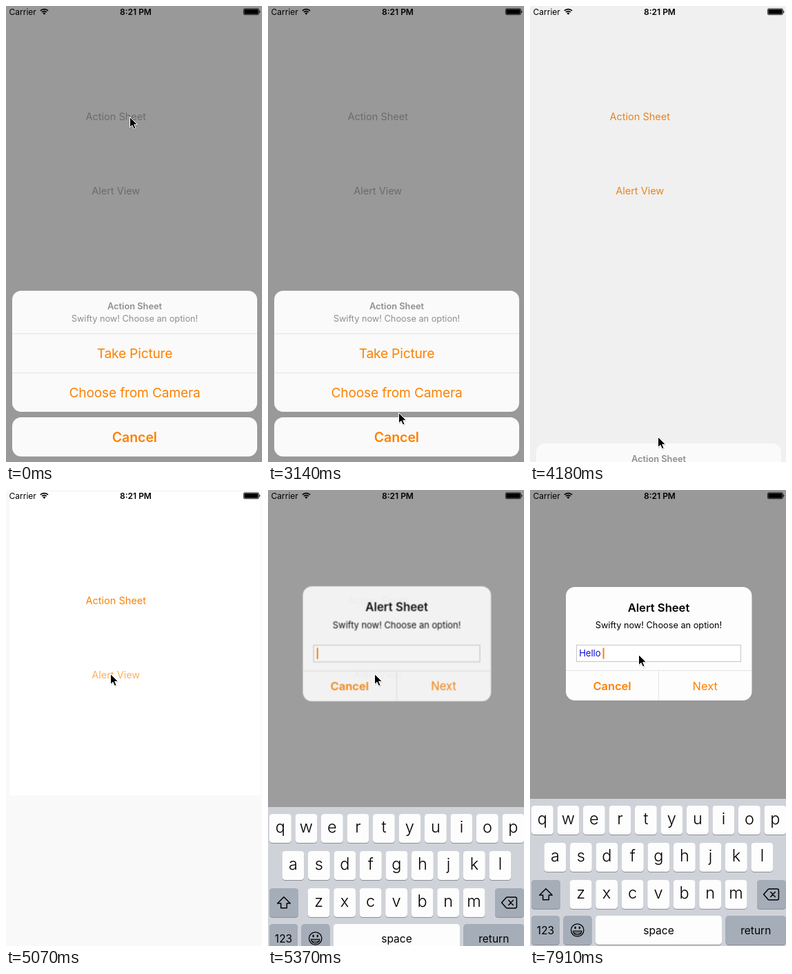
An HTML page for the animation above (8 s loop, 371 px wide and 663 px high).

```html
<!DOCTYPE html>
<html lang="en">
<head>
<meta charset="utf-8">
<title>Action sheet and alert</title>
<style>
  html, body { margin: 0; width: 100%; height: 100%; overflow: hidden; background: #999; }
  svg { display: block; width: 371px; height: 663px; font-family: Inter, Roboto, sans-serif; }
  .mid { text-anchor: middle; }
  .semi { font-weight: 600; }
  .tint { fill: #ff8000; }
  .row { font-size: 19.2px; letter-spacing: -.2px; }
  .note { font-size: 12.75px; }
  .btn { font-size: 16.4px; }
  .letter { font-size: 23.5px; font-weight: 300; }
  .word { font-size: 15.5px; }
  .icon { fill: none; stroke: #000; stroke-width: 1.5; stroke-linejoin: round; stroke-linecap: round; }

  .anim { animation: 8s step-end infinite; }
  #page { animation-name: page; }
  #glow { animation-name: glow; }
  #open-sheet { animation-name: sheet-label; font-size: 14.5px; }
  #open-alert { animation-name: alert-label; font-size: 14.5px; }
  #sheet { animation-name: sheet; }
  #cancel { animation-name: press; }
  #alert { animation-name: alert; transform-origin: 186.5px 223.5px; }
  #keys { animation-name: keys; }
  #typed { animation-name: typed; }
  #caret { animation-name: caret, blink; }
  #pointer { animation-name: pointer; }

  @keyframes page {
    0% { fill: #999; }
    50.375% { fill: #bcbcbc; }
    52.25% { fill: #f0f0f0; }
    54.125% { fill: #f9f9f9; }
    65.25% { fill: #bebebe; }
    67.125% { fill: #9d9d9d; }
    69%, 100% { fill: #999; }
  }
  @keyframes glow {
    0% { visibility: hidden; }
    55.875% { visibility: visible; }
    65.25%, 100% { visibility: hidden; }
  }
  @keyframes sheet-label {
    0% { fill: #6b6b6b; }
    50.375% { fill: #9c7245; }
    52.25% { fill: #e78420; }
    54.125% { fill: #ff8000; }
    65.25% { fill: #a07548; }
    67.125%, 100% { fill: #6b6b6b; }
  }
  @keyframes alert-label {
    0% { fill: #6b6b6b; }
    50.375% { fill: #9c7245; }
    52.25% { fill: #e78420; }
    54.125% { fill: #ff8000; }
    63.375% { fill: #ffb05c; }
    65.25% { fill: #a07548; }
    67.125%, 100% { fill: #6b6b6b; }
  }
  @keyframes sheet {
    0% { transform: translateY(0); visibility: visible; }
    50.375% { transform: translateY(88.5px); }
    52.25% { transform: translateY(222px); visibility: visible; }
    54.125%, 100% { transform: translateY(260px); visibility: hidden; }
  }
  @keyframes press {
    0% { fill: #fafafa; }
    46.75% { fill: #e8e8e8; }
    48.5%, 100% { fill: #fafafa; }
  }
  @keyframes alert {
    0% { opacity: 0; transform: scale(1.2); }
    65.25% { opacity: .5; transform: scale(1.08); }
    67.125% { opacity: .89; transform: scale(1.012); }
    69%, 100% { opacity: 1; transform: none; }
  }
  @keyframes keys {
    0% { transform: translateY(220px); }
    65.25% { transform: translateY(110px); }
    67.125% { transform: translateY(12px); }
    69%, 100% { transform: none; }
  }
  @keyframes typed {
    0% { width: 0; }
    84% { width: 10px; }
    87.75% { width: 17.5px; }
    91.5% { width: 20.8px; }
    93.375% { width: 24px; }
    95.125%, 100% { width: 36px; }
  }
  @keyframes caret {
    0% { transform: none; }
    84% { transform: translateX(9px); }
    87.75% { transform: translateX(16.4px); }
    91.5% { transform: translateX(19.7px); }
    93.375% { transform: translateX(23px); }
    95.125% { transform: translateX(30.3px); }
    98.875%, 100% { transform: translateX(33.5px); }
  }
  @keyframes blink {
    0% { opacity: 1; }
    72.75% { opacity: 0; }
    78.375%, 100% { opacity: 1; }
  }
  @keyframes pointer {
    0% { transform: translate(179px, 161px); }
    1.875% { transform: translate(184px, 232px); }
    3.75% { transform: translate(196px, 420px); }
    5.5% { transform: translate(200px, 504px); }
    39.25% { transform: translate(189px, 591px); }
    41.125% { transform: translate(187px, 604px); }
    44.875% { transform: translate(185px, 626px); }
    55.875% { transform: translate(176px, 480px); }
    57.75% { transform: translate(156px, 300px); }
    61.5% { transform: translate(151px, 267px); }
    65.25% { transform: translate(153px, 267px); }
    67.125% { transform: translate(154px, 267px); }
    70.875% { transform: translate(156px, 255px); }
    72.75% { transform: translate(158px, 239px); }
    74.625%, 100% { transform: translate(157px, 239px); }
  }
</style>
</head>
<body>
<svg viewBox="0 0 371 663">
  <defs>
    <clipPath id="reveal"><rect id="typed" class="anim" x="71" y="226" width="0" height="23"/></clipPath>
  </defs>

  <rect id="page" class="anim" width="371" height="663"/>
  <rect id="glow" class="anim" x="5" y="3" width="364" height="441" fill="#fff"/>
  <text id="open-sheet" class="anim mid" x="159.3" y="166.3">Action Sheet</text>
  <text id="open-alert" class="anim mid" x="159.2" y="274.3">Alert View</text>

  <g id="status" font-size="12">
    <text x="4.6" y="12.7">Carrier</text>
    <text class="mid semi" x="188" y="12.7">8:21 PM</text>
    <g fill="none" stroke="#000" stroke-width="1.7">
      <path d="M49.8 6.9a7.9 7.9 0 0 1 11.2 0"/>
      <path d="M51.9 9a4.9 4.9 0 0 1 7 0"/>
    </g>
    <path d="M55.4 12.8l-2.1-2.2a3 3 0 0 1 4.2 0z"/>
    <rect x="344.4" y="3.9" width="22" height="8.8" rx="1.6" fill="none" stroke="#000" stroke-width=".8"/>
    <rect x="345.3" y="4.8" width="20.2" height="7" rx=".8"/>
    <path d="M367.3 6.6a2 2 0 0 1 0 3.6z"/>
  </g>

  <g id="sheet" class="anim">
    <rect x="9" y="414" width="355" height="176" rx="13" fill="#fafafa"/>
    <path d="M9 476.5h355M9 533.5h355" stroke="#e4e4e4"/>
    <g fill="#8f8f8f" class="mid">
      <text class="semi" font-size="12.8" x="186.5" y="441">Action Sheet</text>
      <text class="note" x="186.5" y="458.6">Swifty now! Choose an option!</text>
    </g>
    <g class="mid tint">
      <text class="row" x="186.5" y="512">Take Picture</text>
      <text class="row" x="186.5" y="569">Choose from Camera</text>
    </g>
    <rect id="cancel" class="anim" x="9" y="598" width="355" height="57" rx="13"/>
    <text class="mid tint semi" font-size="19.4" x="186.4" y="633.5">Cancel</text>
  </g>

  <g id="alert" class="anim">
    <rect x="52" y="141" width="269.5" height="165" rx="13" fill="#fdfdfd"/>
    <g class="mid">
      <text class="semi" font-size="16.6" x="186.5" y="177">Alert Sheet</text>
      <text class="note" x="186.5" y="201">Swifty now! Choose an option!</text>
    </g>
    <rect x="67.5" y="225.5" width="238" height="24" fill="#fff" stroke="#c6c6c6"/>
    <path d="M52 262.5h269.5M186.5 263v43" stroke="#e4e4e4"/>
    <g class="mid tint btn">
      <text class="semi" x="119" y="290.5">Cancel</text>
      <text x="253.7" y="290.5">Next</text>
    </g>
    <g clip-path="url(#reveal)"><text font-size="13" x="71.2" y="242.2" fill="#0808d4">Hello</text></g>
    <rect id="caret" class="anim tint" x="72" y="229.5" width="2" height="16"/>
  </g>

  <g id="keys" class="anim">
    <rect y="449" width="371" height="214" fill="#cfd3d9"/>
    <g id="caps" class="mid"></g>
    <g class="icon">
      <path d="M23 579.7l-9.2 9.4h4.9v6.6h8.6v-6.6h4.9z"/>
      <path d="M338.6 588l6.4-7.2q.7-.8 1.8-.8h11.4q2.2 0 2.2 2.2v11.6q0 2.2-2.2 2.2h-11.4q-1.1 0-1.8-.8z"/>
      <path d="M348.7 584.6l6.6 6.8m0-6.8l-6.6 6.8"/>
      <circle cx="68.7" cy="640" r="9.2" stroke-width="1.3"/>
      <path d="M62.5 641.4h12.4q-.8 5.3-6.2 5.3t-6.2-5.3z" stroke-width="1.2"/>
      <path d="M63.4 644h10.6" stroke-width="1"/>
    </g>
    <ellipse cx="65.6" cy="636.4" rx="1.2" ry="1.9"/>
    <ellipse cx="71.8" cy="636.4" rx="1.2" ry="1.9"/>
  </g>

  <g id="pointer" class="anim">
    <path d="M1 1.6V17.4L4.8 14L7.2 19.4L10.2 18L8 12.8H12.6Z" fill="#000" opacity=".15"/>
    <path d="M.5 .5V15.6L4 12.4L6.4 17.8L9 16.7L6.7 11.4H11.4Z" stroke="#fff" stroke-width="1" stroke-linejoin="round"/>
  </g>
</svg>
<script>
  const caps = document.getElementById('caps');

  function add(tag, attrs, label = '') {
    const el = document.createElementNS('http://www.w3.org/2000/svg', tag);
    for (const name in attrs) el.setAttribute(name, attrs[name]);
    el.textContent = label;
    caps.append(el);
  }

  function key(x, y, width, fill, label, type) {
    const box = { x, width, height: 42, rx: 4.5 };
    add('rect', { ...box, y: y + 1, fill: '#8b8f96' });
    add('rect', { ...box, y, fill });
    if (label) add('text', { x: x + width / 2, y: y + 26.8, class: type }, label);
  }

  const light = '#fdfdfd', dark = '#a5adb8';
  const rows = [['qwertyuiop', 2, 459], ['asdfghjkl', 20.5, 513], ['zxcvbnm', 57.7, 567]];
  for (const [letters, left, y] of rows) {
    [...letters].forEach((c, i) => key(left + i * 37.5, y, 31.8, light, c, 'letter'));
  }
  key(2, 567, 42, dark);
  key(329, 567, 42, dark);
  key(2, 619, 41, dark, '123', 'word');
  key(48.5, 619, 41, dark);
  key(95, 619, 183, light, 'space', 'word');
  key(283.5, 619, 87.5, dark, 'return', 'word');
</script>
</body>
</html>
```
